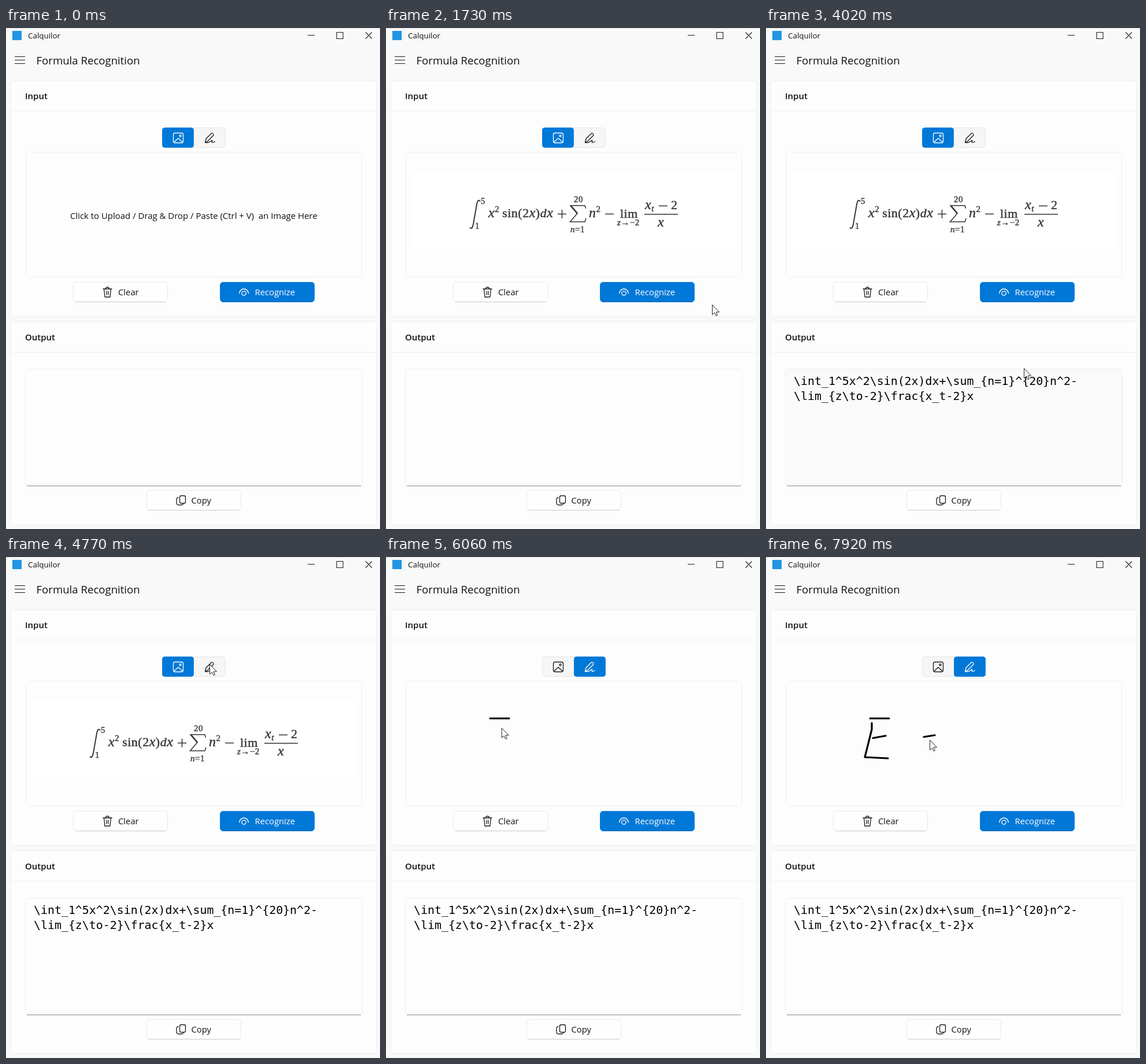
Recreate the animation shown at these times as an HTML page. Size 647 px wide and 866 px high, loop 7990 ms.

```html
<!DOCTYPE html>
<html lang="en">
<head>
<meta charset="utf-8">
<title>Formula Recognition</title>
<style>
  html, body { margin: 0; width: 100%; height: 100%; overflow: hidden; background: #f9f9f9; }
  svg { display: block; }
  text { font: 14.8px "Open Sans", "Noto Sans", sans-serif; fill: #111; }
  .head { font-size: 15px; font-weight: 600; }
  .code { font: 19.9px "DejaVu Sans Mono", monospace; fill: #000; }
  .box { fill: #fdfdfd; stroke: #eee; }
  .button { fill: #fefefe; stroke: #e8e8e8; }
  .accent { fill: #0078d7; stroke: #1483da; }
  .icon, .line { fill: none; stroke: #1a1a1a; stroke-width: 1.3; stroke-linecap: round; stroke-linejoin: round; }
  .line { stroke-linecap: butt; stroke-width: 1.1; }
  .white { stroke: #fff; }
  .math text { font: 22px "Liberation Serif", serif; letter-spacing: .5px; fill: #333; stroke: #333; stroke-width: .4; }
  .math .var { font-size: 24px; font-style: italic; }
  .math .small { font-size: 15px; }
  .math .small .var { font-size: inherit; }
  .math path { fill: none; stroke: #333; stroke-width: 1.5; }
</style>
</head>
<body>
<svg width="647" height="866" viewBox="0 0 647 866">
  <rect width="647" height="866" fill="#f9f9f9"/>
  <path d="M0 .5H647" stroke="#e2e2e2"/>

  <rect x="11" y="5" width="16" height="16" fill="#2196e3"/>
  <text x="38" y="18" style="font-size:13.4px">Calquilor</text>
  <path class="line" d="M522 12.5h12m38-5h11v11h-11zm50 0l11 11m0-11l-11 11"/>
  <path class="line" d="M15 49.5h18m-18 6h18m-18 6h18"/>
  <text x="52.5" y="63" style="font-size:18.6px">Formula Recognition</text>

  <rect class="box" x="8.5" y="91.5" width="633" height="407" rx="5"/>
  <rect class="box" x="8.5" y="507.5" width="633" height="351" rx="5"/>
  <path d="M9 143.5H641M9 560.5H641" stroke="#eee"/>
  <text class="head" x="33" y="123">Input</text>
  <text class="head" x="33" y="539.5">Output</text>

  <rect x="270.5" y="172.5" width="109" height="34" rx="5" fill="#f6f6f6" stroke="#e6e6e6"/>
  <rect id="tab" class="accent" y="172.5" width="54" height="34" rx="4"/>
  <g id="picture" class="icon">
    <rect x="289.5" y="181.5" width="17" height="17" rx="3"/>
    <circle cx="301.5" cy="186.5" r="1.5"/>
    <path d="M291 197l7-6.500l7 6.500"/>
  </g>
  <path id="pen" class="icon" d="M344.5 198l1.500-6.500l9.500-9.500q3-1 3.500 3.500l-9.500 9.500zh5q5-2 7-4v4l5-1.500"/>

  <rect class="box" x="34.5" y="214.5" width="581" height="216" rx="5"/>
  <text id="hint" x="111" y="329.5" style="font-size:14.95px">Click to Upload / Drag &amp; Drop / Paste (Ctrl + V)&nbsp; an Image Here</text>

  <g id="formula" class="math">
    <rect x="44" y="250" width="560" height="132" fill="#fff"/>
    <path d="M163 300q-4-6-6 5l-6 34q-2 10-6 6" style="stroke-width:1.9"/>
    <text class="small" x="164" y="303.5">5</text>
    <text class="small" x="154" y="346.5">1</text>
    <text x="177" y="327"><tspan class="var">x</tspan><tspan class="small" dy="-9">2</tspan><tspan dx="5" dy="9">sin(2</tspan><tspan class="var">x</tspan>)<tspan font-style="italic">d</tspan><tspan class="var">x</tspan></text>
    <path d="M297 321.5h15m-7.500-7.500v15"/>
    <path d="M345.5 312l-1.500-5h-25l12 13.500l-12.500 14.500h25.500l2-6"/>
    <path d="M320 307.5l11 13" style="stroke-width:2.6"/>
    <text class="small" x="325" y="301">20</text>
    <text class="small" x="319" y="353"><tspan class="var">n</tspan>=1</text>
    <text x="351" y="327"><tspan class="var">n</tspan><tspan class="small" dy="-9">2</tspan></text>
    <path d="M379 321.5h15"/>
    <text x="405" y="327.5">lim</text>
    <text class="small" x="400" y="341"><tspan class="var">z</tspan>→−2</text>
    <text x="448" y="313"><tspan class="var">x</tspan><tspan class="small" font-style="italic" dy="4">t</tspan></text>
    <path d="M472 307.5h15M447 322h58"/>
    <text x="493" y="313">2</text>
    <text class="var" x="470" y="343" style="font-size:24px">x</text>
  </g>

  <rect class="button" x="116.5" y="439.5" width="163" height="34" rx="5"/>
  <path d="M120 473.5H276" stroke="#c9c9c9"/>
  <path class="icon" d="M168 451h15m-10.500 0q0-3 3-3t3 3m-9 0l1.500 14h9l1.500-14m-7.500 4v6m3-6v6"/>
  <text x="194" y="462">Clear</text>
  <rect id="recognize" class="accent" x="370.5" y="439.5" width="163" height="34" rx="5"/>
  <path d="M374 473.5H530" stroke="#0067b8"/>
  <path class="icon white" d="M403.5 458.5c2.500-10 13.500-10 16 0"/>
  <circle class="icon white" cx="411.5" cy="458.5" r="3.7"/>
  <text x="430.5" y="462" style="fill:#fff">Recognize</text>

  <rect id="area" class="box" x="33.5" y="589.5" width="583" height="202" rx="5"/>
  <path d="M36 791.5H614" stroke="#8a8a8a"/>
  <g id="result">
    <text class="code" x="48" y="616.5">\int_1^5x^2\sin(2x)dx+\sum_{n=1}^{20}n^2-</text>
    <text class="code" x="48" y="643">\lim_{z\to-2}\frac{x_t-2}x</text>
  </g>

  <rect class="button" x="243.5" y="799.5" width="163" height="34" rx="5"/>
  <path d="M247 833.5H403" stroke="#c9c9c9"/>
  <rect class="icon" x="300.5" y="808.5" width="10" height="13" rx="2.5"/>
  <path class="icon" d="M298 811.5q-3 .5-3 4v5q0 4 4 4h4.500q2.500 0 3.500-2"/>
  <text x="320.5" y="822">Copy</text>

  <path id="ink" fill="none" stroke="#000" stroke-width="3.2" stroke-linecap="round" stroke-linejoin="round"/>
  <g id="cursor">
    <circle id="glow" r="13" fill="#ff0" opacity=".5"/>
    <path d="M.5.5v17l4-3.500l2.500 5.500l2.500-1l-2.500-5.500h5.500z" fill="#fff" stroke="#222"/>
  </g>
</svg>
<script>
const LOOP = 7990, INK_LAG = 60;
const PASTE = 1330, HOVER = 2140, RESULT = 3480, DRAW_MODE = 4900;
const $ = id => document.getElementById(id);

// Pointer legs, each starting where the one before ends
const legs = [];
let last = { end: 200, x: 520, y: 867 };
function leg(start, end, x, y, down = false) {
  last = { start, end, x, y, down, from: last };
  legs.push(last);
}
const move = (start, end, x, y) => leg(start, end, x, y);
const press = (start, end) => leg(start, end, last.x, last.y, true);
const draw = (start, end, x, y) => leg(start, end, x, y, true);

// Enter, paste and recognize
move(200, 720, 620, 470);
move(720, 1000, 558, 469);
move(PASTE, 1730, 564, 478);
move(1730, 2210, 474, 468);
press(2210, 2340);
move(2670, 3150, 446, 588);
// Switch to handwriting
move(4020, 4770, 352, 185);
press(4840, DRAW_MODE);
move(DRAW_MODE, 5240, 225, 268);
move(5240, 5580, 180, 279);
// Write the letter E and begin an equals sign
draw(5650, 5950, 213, 279);
move(5950, 6180, 185, 313);
draw(6180, 6410, 207, 309);
move(6410, 6600, 183, 287);
draw(6600, 6760, 183, 298);
draw(6760, 6970, 171, 346);
draw(6970, 7220, 211, 348);
move(7300, 7600, 273, 311);
draw(7600, 7850, 292, 308);
move(7850, 7920, 283, 316);

// Drawing is steady, free movement eases in and out
function along({ start, end, x, y, down, from }, t) {
  const f = Math.min(1, Math.max(0, (t - start) / (end - start)));
  const k = down ? f : f * f * (3 - 2 * f);
  return [from.x + (x - from.x) * k, from.y + (y - from.y) * k];
}

const pointer = t => along(legs.findLast(l => l.start <= t) || legs[0], t);

const inkPath = t => legs
  .filter(l => l.down && l.start >= DRAW_MODE && l.start < t)
  .map(l => `M${l.from.x} ${l.from.y}L${along(l, t)}`)
  .join("");

const show = (id, on) => $(id).style.display = on ? "" : "none";

function render(t) {
  const [x, y] = pointer(t);
  const drawing = t >= DRAW_MODE;
  const overArea = x > 33 && x < 617 && y > 587 && y < 792;

  show("cursor", t >= 200);
  show("glow", legs.some(l => l.down && t >= l.start && t < l.end));
  $("cursor").setAttribute("transform", `translate(${x} ${y})`);
  $("ink").setAttribute("d", inkPath(t - INK_LAG));

  show("hint", t < PASTE);
  show("formula", t >= PASTE && !drawing);
  show("result", t >= RESULT);
  $("area").style.fill = overArea ? "#fafafa" : "";
  $("recognize").style.fill = t >= HOVER && t < RESULT ? "#0080e0" : "";
  $("tab").setAttribute("x", drawing ? 325.5 : 270.5);
  $("picture").style.stroke = drawing ? "" : "#fff";
  $("pen").style.stroke = drawing ? "#fff" : "";
}

function tick() {
  render(performance.now() % LOOP);
  requestAnimationFrame(tick);
}
tick();
</script>
</body>
</html>
```
